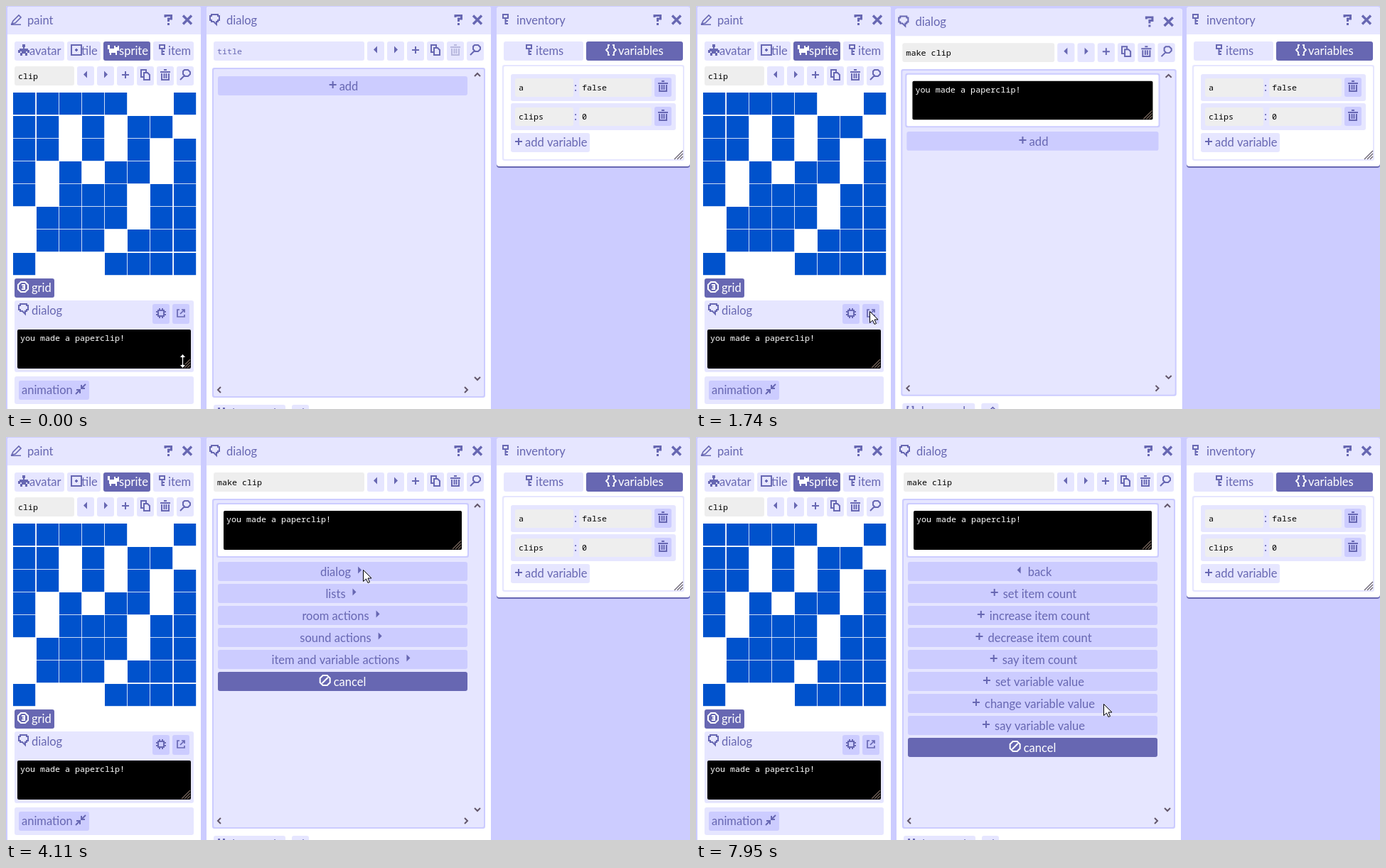
Animation, 962 px wide and 568 px high, one loop 8 s. Source, as an HTML page with a canvas:

```html
<!DOCTYPE html>
<html lang="en">
<head>
<meta charset="utf-8">
<title>Dialog editor</title>
<style>
html, body { margin: 0; width: 962px; height: 568px; overflow: hidden; background: #ccf; }
canvas { display: block; }
</style>
</head>
<body>
<canvas width="962" height="568"></canvas>
<script>
const ctx = document.querySelector('canvas').getContext('2d');
const LOOP = 8000;
const INK = '#6767b2', MID = '#ccf', PALE = '#e6e6ff', FIELD = '#eee', WHITE = '#fff', BLACK = '#000';
const SANS = '16.5px Lato, sans-serif', MONO = '11.67px "Noto Sans Mono", monospace';

// Icons sit in a 16 by 16 box; a width of 0 means filled.
const icons = {
  help: [3, 'M3 5V2.5H11.5V7H7.5V11M6 14.5H9'],
  close: [3.4, 'M2 2.5L14 14.5M14 2.5L2 14.5'],
  pencil: [1.6, 'M2 14L4 10L12 2L15 5L7 13ZM1 15.2H15'],
  bubble: [2, 'M4 1H13V3H15V9H13V11H11V15L7 11H4V9H2V3H4Z'],
  key: [2, 'M1 1H8V6H1ZM4.5 6V15M4.5 10H8M4.5 14H8'],
  avatar: [0, 'M6 0H10V4H9V6H14V8H16V12H13V10H11V12H13V16H10V13H6V16H3V12H5V10H3V12H0V8H2V6H7V4H6Z'],
  tile: [2, 'M1 1H15V15H1ZM6 8H10M8 6V10'],
  cat: [0, 'M0 1H3V6H9V2H11V4H14V2H16V9H13V15H11V12H5V15H3V12H2V7H0Z'],
  prev: [0, 'M10 2.5V12.5L5 7.5Z'],
  next: [0, 'M6 2.5V12.5L11 7.5Z'],
  plus: [2, 'M3 8H13M8 3V13'],
  copy: [2, 'M9 4V1H2V11H5M6 5H11L14 8V15H6Z'],
  trash: [2, 'M1 4H15M6 1H10M3 6V15H13V6M6.5 6V13M9.5 6V13'],
  search: [2, 'M7 1H12L15 4V7L12 10H8L5 7V3ZM7 9L1 15'],
  gear: [2, 'M4 4H12V12H4ZM6 1V4M10 1V4M6 12V15M10 12V15M1 6H4M1 10H4M12 6H15M12 10H15'],
  open: [1.7, 'M6 3H3V13H13V10M9 3H13V7M13 3L7 9'],
  shrink: [2, 'M9 2V7H14M9 7L15 1M2 9H7V14M7 9L1 15'],
  eye: [2, 'M5 1H11L15 5V11L11 15H5L1 11V5ZM6 5H10V11H6M7 8H10'],
  cancel: [2, 'M5 1H11L15 5V11L11 15H5L1 11V5ZM4 12L12 4'],
  braces: [1.8, 'M6 1H4V5L1 8L4 11V15H6M10 1H12V5L15 8L12 11V15H10']
};
for (const name in icons) icons[name][1] = new Path2D(icons[name][1]);
const arrow = new Path2D('M0 0V16L4 12.5L6.5 18L9 17L6.5 11.5H11.5Z');
const resize = new Path2D('M0 -10L4.5 -5H1.2V5H4.5L0 10L-4.5 5H-1.2V-5H-4.5Z');

const rootMenu = ['dialog', 'lists', 'room actions', 'sound actions', 'item and variable actions'];
const actionMenu = ['back', 'set item count', 'increase item count', 'decrease item count',
  'say item count', 'set variable value', 'change variable value', 'say variable value'];
const bitmap = [0xF9, 0xD6, 0xD5, 0xAD, 0xBB, 0x7B, 0x77, 0x8F];

// Each key is [time, x, y].
const pointerPath = [[150, 248, 500], [600, 252, 465], [760, 252, 450], [1070, 244, 430],
  [2290, 244, 430], [2820, 484, 200], [3010, 502, 186], [4070, 502, 186], [4850, 481, 291],
  [4880, 481, 291], [5190, 473, 315], [6480, 473, 315], [7330, 522, 347], [7950, 573, 376]];
// Each key is [time, lift, squash].
const hopPath = [[1425, 0, 0], [1430, 0, .025], [1525, -24.5, .005], [1640, 0, .025], [1810, 0, 0]];
// Each click is [ring shown, button pressed, result].
const clicks = [[1330, 1390, 1430], [3240, 3310, 3390], [5460, 5520, 5580]];

function at(keys, t) {
  const i = keys.findIndex(k => k[0] > t);
  if (i < 0) return keys[keys.length - 1].slice(1);
  if (i === 0) return keys[0].slice(1);
  const a = keys[i - 1], b = keys[i], u = (t - a[0]) / (b[0] - a[0]), s = u * u * (3 - 2 * u);
  return [1, 2].map(n => a[n] + (b[n] - a[n]) * s);
}

function box(x, y, w, h, fill, r = 3) {
  ctx.fillStyle = fill;
  ctx.beginPath();
  ctx.roundRect(x, y, w, h, r);
  ctx.fill();
}

function frame(x, y, w, h, edge, fill) {
  box(x, y, w, h, edge);
  box(x + 2, y + 2, w - 4, h - 4, fill, 2);
}

function text(s, x, y, color = INK, font = SANS) {
  ctx.font = font;
  ctx.fillStyle = color;
  ctx.fillText(s, x, y);
}

const mono = (s, x, y, color = BLACK) => text(s, x, y, color, MONO);

function line(color, width, ...points) {
  ctx.strokeStyle = color;
  ctx.lineWidth = width;
  ctx.beginPath();
  points.forEach(p => ctx.lineTo(...p));
  ctx.stroke();
}

function icon(name, x, y, color = INK) {
  const [width, path] = icons[name];
  ctx.save();
  ctx.translate(x, y);
  ctx.fillStyle = ctx.strokeStyle = color;
  ctx.lineWidth = width;
  if (width) ctx.stroke(path); else ctx.fill(path);
  ctx.restore();
}

function grip(x, y, color) {
  for (const k of [4, 8, 12]) line(color, 1.3, [x - k, y], [x, y - k]);
}

function tab(x, w, name, iconX, label, textX, active) {
  const color = active ? WHITE : INK;
  box(x, 50, w, 27, active ? INK : PALE);
  icon(name, iconX, 54, color);
  text(label, textX, 69, color);
}

function toolbar(x, y, dimTrash) {
  ['prev', 'next', 'plus', 'copy', 'trash', 'search'].forEach((name, i) => {
    const left = Math.round(x + i * 28);
    box(left, y, 24, 27, PALE);
    icon(name, left + 4, y + 4, dimTrash && name === 'trash' ? '#b8b8de' : INK);
  });
}

function header(x, w, name, iconX, title, titleX) {
  box(x, 1, w, 39, PALE, [3, 3, 0, 0]);
  icon(name, iconX, 11);
  text(title, titleX, 26);
  icon('help', x + w - 53, 11);
  icon('close', x + w - 27, 11);
}

function textBlock(x, y, w) {
  box(x, y, w, 55, BLACK, 2);
  mono('you made a paperclip!', x + 4, y + 16, WHITE);
  grip(x + w - 1, y + 54, '#77665c');
}

function menuButton(y, name, label, { dark, after, gap = 4 } = {}) {
  const color = dark ? WHITE : INK;
  box(298, y, 351, 27, dark ? INK : MID);
  ctx.font = SANS;
  const width = ctx.measureText(label).width, left = 473.5 - (width + 16 + gap) / 2;
  icon(name, after ? left + width + gap : left, y + 4, color);
  text(label, after ? left : left + 16 + gap, y + 20, color);
}

function paintPanel(pressed) {
  box(2, 1, 272, 570, WHITE);
  header(2, 272, 'pencil', 6, 'paint', 30);
  tab(12, 70, 'avatar', 17, 'avatar', 33);
  tab(86, 47, 'tile', 91, 'tile', 106);
  tab(137, 66, 'cat', 143, 'sprite', 159, true);
  tab(207, 57, 'key', 215, 'item', 228);
  box(12, 85, 84, 27, FIELD);
  mono('clip', 17, 103);
  toolbar(100, 85);
  ctx.fillStyle = '#0052cc';
  bitmap.forEach((row, y) => {
    for (let x = 0; x < 8; x++)
      if (row >> (7 - x) & 1) ctx.fillRect(10 + Math.ceil(x * 32.15), 122 + Math.ceil(y * 32.15), 31.2, 31.2);
  });
  box(12, 384, 56, 27, INK);
  icon('eye', 16, 388, WHITE);
  text('grid', 36, 403, WHITE);
  box(12, 415, 252, 101, PALE);
  icon('bubble', 16, 419);
  text('dialog', 36, 435);
  box(206, 420, 24, 28, MID);
  icon('gear', 210, 425);
  box(234, 420, 24, 28, pressed ? INK : MID);
  icon('open', 238, 425, pressed ? WHITE : INK);
  textBlock(16, 456, 244);
  box(12, 522, 252, 39, PALE);
  box(18, 528, 99, 27, MID);
  text('animation', 22, 547);
  icon('shrink', 97, 532);
}

function dialogMenu(t) {
  const [, add, group] = clicks;
  if (t < add[2]) {
    menuButton(176, 'plus', 'add', { gap: 1, dark: t >= add[1] });
    return;
  }
  const root = t < group[2], labels = root ? rootMenu : actionMenu;
  labels.forEach((label, i) => {
    const name = root ? 'next' : i ? 'plus' : 'prev';
    menuButton(176 + i * 31, name, label, { after: root, dark: root && i === 4 && t >= group[1] });
  });
  menuButton(176 + labels.length * 31, 'cancel', 'cancel', { dark: true });
}

function dialogPanel(t) {
  const opened = t >= clicks[0][2], [lift, squash] = at(hopPath, t);
  ctx.save();
  ctx.translate(482, 300 + lift);
  ctx.scale(1 + squash, 1 - squash);
  ctx.translate(-482, -300);
  box(282, 1, 400, 599, WHITE);
  header(282, 400, 'bubble', 285, 'dialog', 310);
  box(292, 50, 212, 27, opened ? FIELD : PALE);
  mono(opened ? 'make clip' : 'title', 297, 68, opened ? BLACK : INK);
  toolbar(508, 50, !opened);
  frame(290, 87, 384, 465, MID, PALE);
  const edge = '#62566a';
  line(edge, 2, [659, 99], [663, 95], [667, 99]);
  line(edge, 2, [659, 523], [663, 527], [667, 523]);
  line(edge, 2, [302, 537], [298, 541], [302, 545]);
  line(edge, 2, [645, 537], [649, 541], [645, 545]);
  if (opened) {
    frame(296, 93, 355, 77, MID, WHITE);
    textBlock(306, 104, 335);
    dialogMenu(t);
  } else {
    menuButton(99, 'plus', 'add', { gap: 1 });
  }
  box(292, 562, 101, 27, PALE);
  icon('braces', 295, 566);
  text('show code', 311, 580);
  box(402, 562, 24, 27, PALE);
  icon('pencil', 406, 566);
  grip(674, 590, '#665f70');
  ctx.restore();
}

function inventoryPanel() {
  box(690, 1, 272, 227, INK, 4);
  box(690, 1, 272, 225, WHITE, 4);
  header(690, 272, 'key', 698, 'inventory', 718);
  tab(700, 112, 'key', 731, 'items', 745);
  tab(816, 136, 'braces', 843, 'variables', 861, true);
  frame(698, 83, 256, 135, PALE, WHITE);
  [['a', 'false'], ['clips', '0']].forEach(([name, value], i) => {
    const y = 96 + i * 41;
    box(710, y, 232, 38, PALE);
    box(716, y + 6, 82, 26, FIELD);
    box(806, y + 6, 102, 26, FIELD);
    mono(name, 721, y + 23);
    text(':', 799, y + 24);
    mono(value, 810, y + 23);
    box(912, y + 5, 24, 27, MID);
    icon('trash', 916, y + 9);
  });
  box(710, 179, 111, 27, PALE);
  icon('plus', 713, 183);
  text('add variable', 730, 198);
  grip(952, 216, '#665f70');
}

function pointer(t) {
  const [x, y] = at(pointerPath, t);
  if (clicks.some(c => t >= c[0] && t < c[2])) {
    ctx.fillStyle = 'rgba(225, 190, 170, .6)';
    ctx.beginPath();
    ctx.arc(x, y, 12, 0, 7);
    ctx.fill();
  }
  if (t >= 260 && y > 456) {
    for (const side of [-1, 1]) line(WHITE, 1, [x - 3, y + 8 * side], [x + 3, y + 8 * side]);
    line(WHITE, 1, [x, y - 8], [x, y + 8]);
    return;
  }
  const path = t < 260 ? resize : arrow;
  ctx.save();
  ctx.translate(Math.round(x) + .5, Math.round(y) + .5);
  ctx.fillStyle = WHITE;
  ctx.strokeStyle = BLACK;
  ctx.lineWidth = 1;
  ctx.fill(path);
  ctx.stroke(path);
  ctx.restore();
}

function draw() {
  const t = performance.now() % LOOP;
  ctx.fillStyle = MID;
  ctx.fillRect(0, 0, 962, 568);
  paintPanel(t >= clicks[0][1] && t < clicks[0][2]);
  inventoryPanel();
  dialogPanel(t);
  pointer(t);
  requestAnimationFrame(draw);
}
draw();
</script>
</body>
</html>
```
